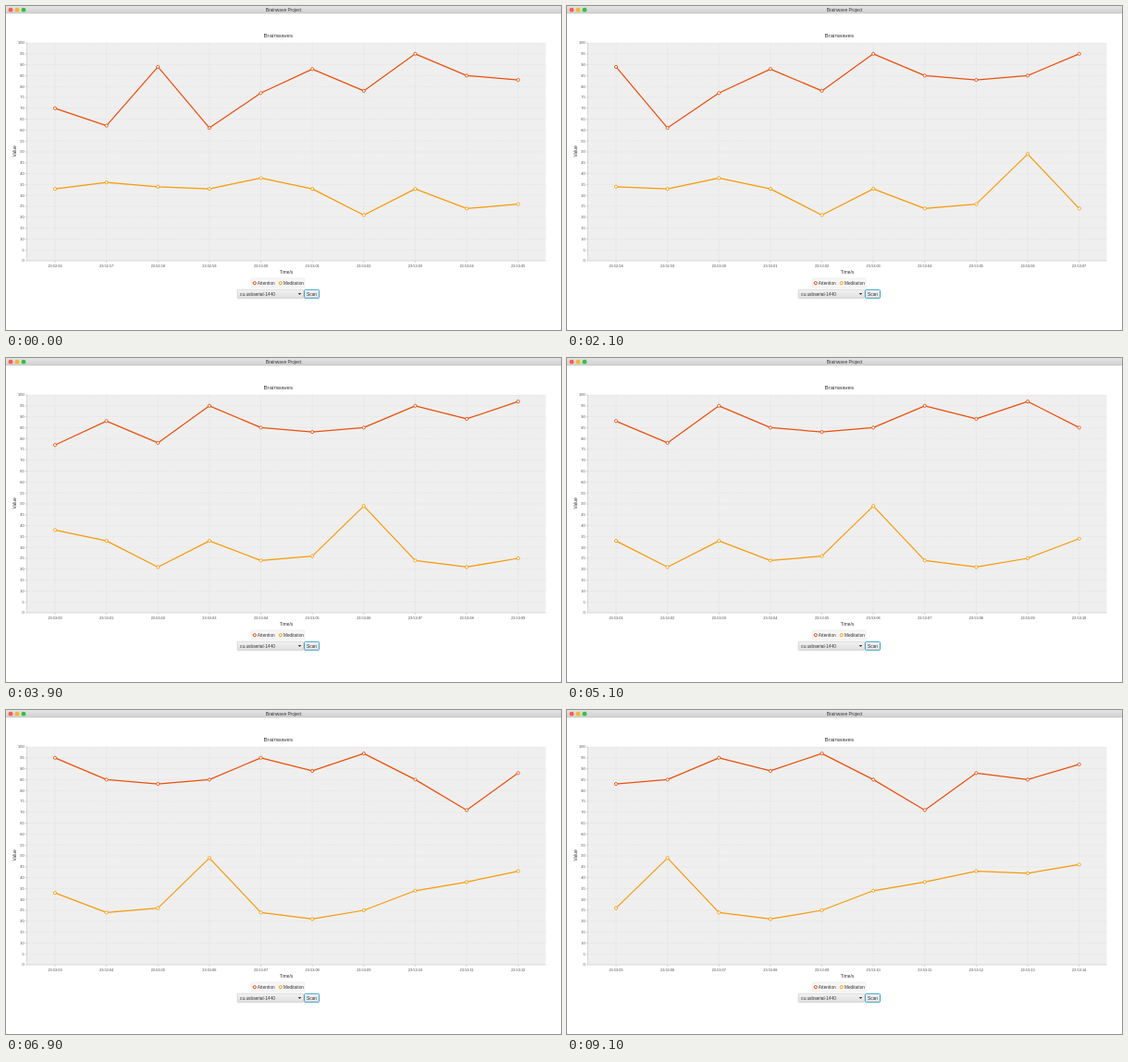
These frames come from a looping animation (600 by 351 pixels, 9800 ms). An HTML page:

```html
<!DOCTYPE html>
<html lang="en">
<head>
<meta charset="utf-8">
<title>Brainwave Project</title>
<style>
html, body { margin: 0; width: 100%; height: 100%; overflow: hidden; background: #fff; }
svg { display: block; width: 600px; height: 351px; font: 4px "Liberation Sans", Arial, sans-serif; fill: #333; }
.mid { text-anchor: middle; }
.tick { fill: #444; font-size: 3.9px; }
.grid { stroke: #d9d9d9; stroke-width: .5; stroke-dasharray: 1.6 1.2; }
.axis { stroke: #b4b4b4; stroke-width: .5; fill: none; }
</style>
</head>
<body>
<svg id="stage" viewBox="0 0 600 351">
  <defs>
    <linearGradient id="bar" x2="0" y2="1"><stop stop-color="#e4e4e4"/><stop offset="1" stop-color="#d0d0d0"/></linearGradient>
    <linearGradient id="btn" x2="0" y2="1"><stop stop-color="#f3f3f3"/><stop offset="1" stop-color="#dedede"/></linearGradient>
  </defs>
  <rect width="600" height="351" fill="#fff"/>
  <rect width="600" height="8" fill="url(#bar)"/>
  <rect y="7.7" width="600" height=".5" fill="#b8b8b8"/>
  <circle cx="5" cy="4.2" r="2.4" fill="#fb5a52"/>
  <circle cx="12" cy="4.2" r="2.4" fill="#f6b62c"/>
  <circle cx="19" cy="4.2" r="2.4" fill="#2fc23f"/>
  <text class="mid" x="300" y="6" font-size="4.8">Brainwave Project</text>
  <text class="mid" x="294.3" y="34.2" font-size="6.1">Brainwaves</text>
  <rect x="22.5" y="40" width="561" height="236" fill="#efefef"/>
  <g id="grid"></g>
  <path class="axis" d="M22.5 40V276H583.5"/>
  <g id="lines"></g>
  <text class="mid" x="303" y="290.4" font-size="4.9">Time/s</text>
  <text class="mid" transform="translate(11 157.3) rotate(-90)" font-size="4.9">Value</text>
  <rect x="265" y="295" width="58" height="10" rx="1.5" fill="#f7f7f7" stroke="#e2e2e2" stroke-width=".5"/>
  <g fill="#fff" stroke-width="1">
    <circle cx="268.8" cy="300.2" r="1.6" stroke="#e9500d"/>
    <circle cx="296.8" cy="300.2" r="1.6" stroke="#f59b0a"/>
  </g>
  <text x="271.8" y="301.9" font-size="4.8">Attention</text>
  <text x="299.9" y="301.9" font-size="4.8">Meditation</text>
  <rect x="250.2" y="307.2" width="71.3" height="9.6" rx="1.2" fill="url(#btn)" stroke="#bdbdbd" stroke-width=".5"/>
  <text x="253" y="313.7" font-size="4.8">cu.usbserial-1440</text>
  <path d="M315.8 311h3.4l-1.7 1.9z"/>
  <rect x="322.5" y="307.4" width="16" height="9.2" rx="1.2" fill="url(#btn)" stroke="#2a9fce" stroke-width=".9"/>
  <text class="mid" x="330.5" y="313.7" font-size="4.8">Scan</text>
</svg>
<script>
const series = [
  { color: '#e9500d', data: [70, 62, 89, 61, 77, 88, 78, 95, 85, 83, 85, 95, 89, 97, 85, 71, 88, 85, 92] },
  { color: '#f59b0a', data: [33, 36, 34, 33, 38, 33, 21, 33, 24, 26, 49, 24, 21, 25, 34, 38, 43, 42, 46] }
];
const COUNT = 10, LOOP = 9800;
const px = i => 53 + i * 55.63;
const py = v => 276 - v * 2.36;
const grid = document.getElementById('grid');
const lines = document.getElementById('lines');

function add(parent, tag, attrs, text = '') {
  const el = document.createElementNS('http://www.w3.org/2000/svg', tag);
  for (const key in attrs) el.setAttribute(key, attrs[key]);
  el.textContent = text;
  return parent.appendChild(el);
}

for (let v = 0; v <= 100; v += 5) {
  const y = py(v);
  if (v) add(grid, 'path', { class: 'grid', d: `M22.5 ${y}H583.5` });
  add(grid, 'path', { class: 'axis', d: `M20.5 ${y}h2` });
  add(grid, 'text', { class: 'tick', x: 19.6, y: y + 1.4, 'text-anchor': 'end' }, v);
}

const labels = [];
for (let i = 0; i < COUNT; i++) {
  add(grid, 'path', { class: 'grid', d: `M${px(i)} 40V276` });
  add(grid, 'path', { class: 'axis', d: `M${px(i)} 276v2` });
  labels.push(add(grid, 'text', { class: 'tick mid', x: px(i), y: 283.4 }));
}

for (const s of series) {
  s.line = add(lines, 'polyline', { fill: 'none', stroke: s.color, 'stroke-width': 1.25, 'stroke-linejoin': 'round' });
  s.dots = Array.from({ length: COUNT }, (_, i) =>
    add(lines, 'circle', { cx: px(i), r: 1.6, fill: '#fff', stroke: s.color, 'stroke-width': .9 }));
}

function clock(n) {
  const sec = 176 + n;
  return `23:${50 + Math.floor(sec / 60)}:${String(sec % 60).padStart(2, '0')}`;
}

function show(start) {
  labels.forEach((label, i) => label.textContent = clock(start + i));
  for (const s of series) {
    const ys = s.data.slice(start, start + COUNT).map(py);
    s.line.setAttribute('points', ys.map((y, i) => `${px(i)},${y}`).join(' '));
    s.dots.forEach((dot, i) => dot.setAttribute('cy', ys[i]));
  }
}

// A new sample arrives every second and the window moves on by one.
let shown = -1;
const begin = performance.now();
function frame() {
  const t = (performance.now() - begin) % LOOP;
  const start = Math.floor((t + 100) / 1000);
  if (start !== shown) show(shown = start);
  requestAnimationFrame(frame);
}
frame();
</script>
</body>
</html>
```
